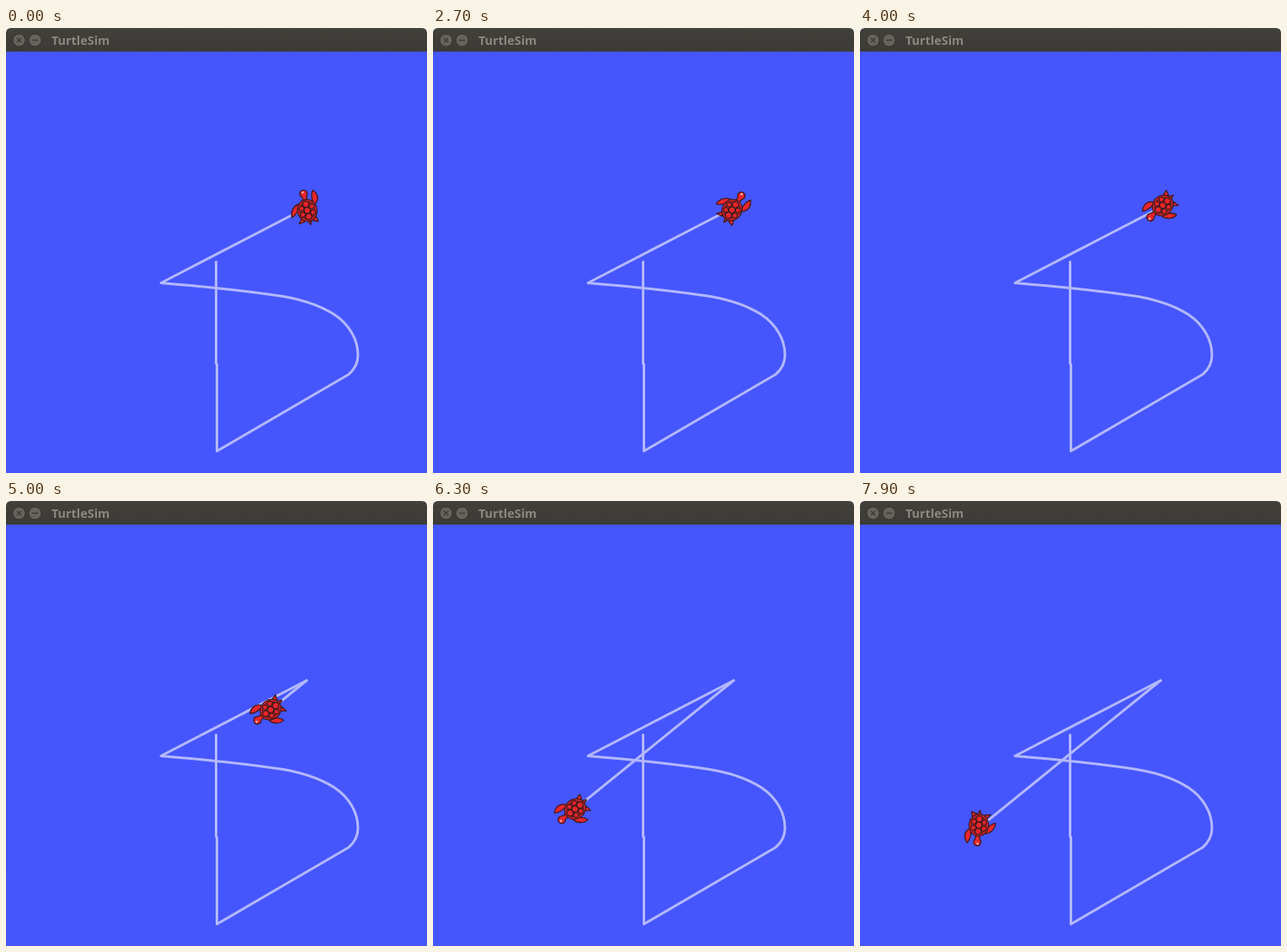
Animation, 500 px wide and 528 px high, one loop 8 s. Source, as an HTML page:

```html
<!DOCTYPE html>
<html lang="en">
<head>
<meta charset="utf-8">
<title>TurtleSim</title>
<style>
  html, body { margin: 0; width: 100%; height: 100%; overflow: hidden; background: #fff; }
  svg { display: block; }
  .title { font: bold 14.4px "Open Sans", sans-serif; fill: #8a8880; }
  .trail { fill: none; stroke: #b3b8ff; stroke-width: 3; stroke-linecap: round; stroke-linejoin: round; }
  .button { fill: #65635b; stroke: #34332f; }
  .sign { fill: none; stroke: #3c3b37; stroke-width: 1.5; }
  #turtle { fill: #ea262c; stroke: #421a1c; stroke-width: 1.3; stroke-linejoin: round; }
</style>
</head>
<body>
<svg width="500" height="528" viewBox="0 0 500 528">
  <defs>
    <linearGradient id="bar" x2="0" y2="1">
      <stop offset="0" stop-color="#454440"/>
      <stop offset=".15" stop-color="#403f3a"/>
      <stop offset="1" stop-color="#3c3b37"/>
    </linearGradient>
  </defs>
  <path fill="url(#bar)" d="M0 28V6Q0 0 6 0H494Q500 0 500 6V28Z"/>
  <circle class="button" cx="15.5" cy="14.5" r="7.5"/>
  <path class="sign" d="M13 12l5 5m0-5l-5 5"/>
  <circle class="button" cx="34.5" cy="14.5" r="7.5"/>
  <path class="sign" d="M31 14.5h7"/>
  <text class="title" x="54" y="20">TurtleSim</text>
  <rect y="28" width="500" height="500" fill="#4556ff"/>
  <rect id="edge" y="1" width="2" height="438" opacity=".04"/>

  <path class="trail" d="M249.5 277.5V398L250.5 399V502L407 411C414 405 418 397 418 388
    C418 370 408 352 390 340C368 326 342 320 319 317C285 312 250 308 184 302.5L357 213"/>
  <path class="trail" id="trail"/>

  <g id="turtle">
    <path d="M-8 11L-13 17L-6 16ZM8 11L10 19L4 17ZM-2 15L0 21L3 15Z"/>
    <path d="M9-3C8-9 9-15 12-18.500C16-14 17-8 13-3.500L10-1Z"/>
    <path d="M-9-6C-15-5-20 1-19.500 7.500C-15 7-12 3-9-1Z"/>
    <path d="M-2-8L-2.500-13C-6-16-4-21 0-21C4-21 6-17 3-13L2-8Z"/>
    <circle cx="-.5" cy="-18.500" r="1.300" fill="#ffb9b9" stroke="none"/>
    <ellipse cy="3.500" rx="11.500" ry="13"/>
    <ellipse cy="3.500" rx="9" ry="10.500" fill="none" stroke-width="1"/>
    <path id="scutes" stroke-width="1.200"/>
  </g>
</svg>
<script>
const LOOP = 8000, STEP = 100;
const START = { x: 357, y: 213 };
const COURSE = 231;        // degrees clockwise from up
const DISTANCE = 285;
const TURN_RATE = 2.8, DRIVE_RATE = 1.35;   // per second

const get = id => document.getElementById(id);
const rad = deg => deg * Math.PI / 180;
const decay = (rate, ms) => Math.exp(-rate * Math.max(0, ms) / 1000);

function hexagon(cx, cy, r) {
  const corners = [0, 1, 2, 3, 4, 5].map(i =>
    `${cx + r * Math.cos(rad(60 * i))} ${cy + r * Math.sin(rad(60 * i))}`);
  return `M${corners.join("L")}Z`;
}

get("scutes").setAttribute("d",
  [-4, 3.5, 11].map(y => hexagon(0, y, 4)).join("") +
  [-6.2, 6.2].map(x => hexagon(x, 0, 3.2) + hexagon(x, 7.3, 3.2)).join(""));

function heading(t) {
  if (t < 2700) return -13;
  if (t <= 7700) return COURSE - 198 * decay(TURN_RATE, t - 2700);
  return COURSE - 107 * (1 - decay(TURN_RATE, t - 7700));
}

function draw(t) {
  const travelled = DISTANCE * (1 - decay(DRIVE_RATE, Math.min(t, 7600) - 4830));
  const x = START.x + travelled * Math.sin(rad(COURSE));
  const y = START.y - travelled * Math.cos(rad(COURSE));
  get("turtle").setAttribute("transform", `translate(${x} ${y}) rotate(${heading(t)})`);
  get("trail").setAttribute("d", `M${START.x} ${START.y}L${x} ${y}`);
  get("edge").style.display = t < 1100 ? "none" : "";
}

const begin = performance.now();
function tick() {
  const t = (performance.now() - begin) % LOOP;
  draw(Math.floor(t / STEP) * STEP);
  requestAnimationFrame(tick);
}
tick();
</script>
</body>
</html>
```
